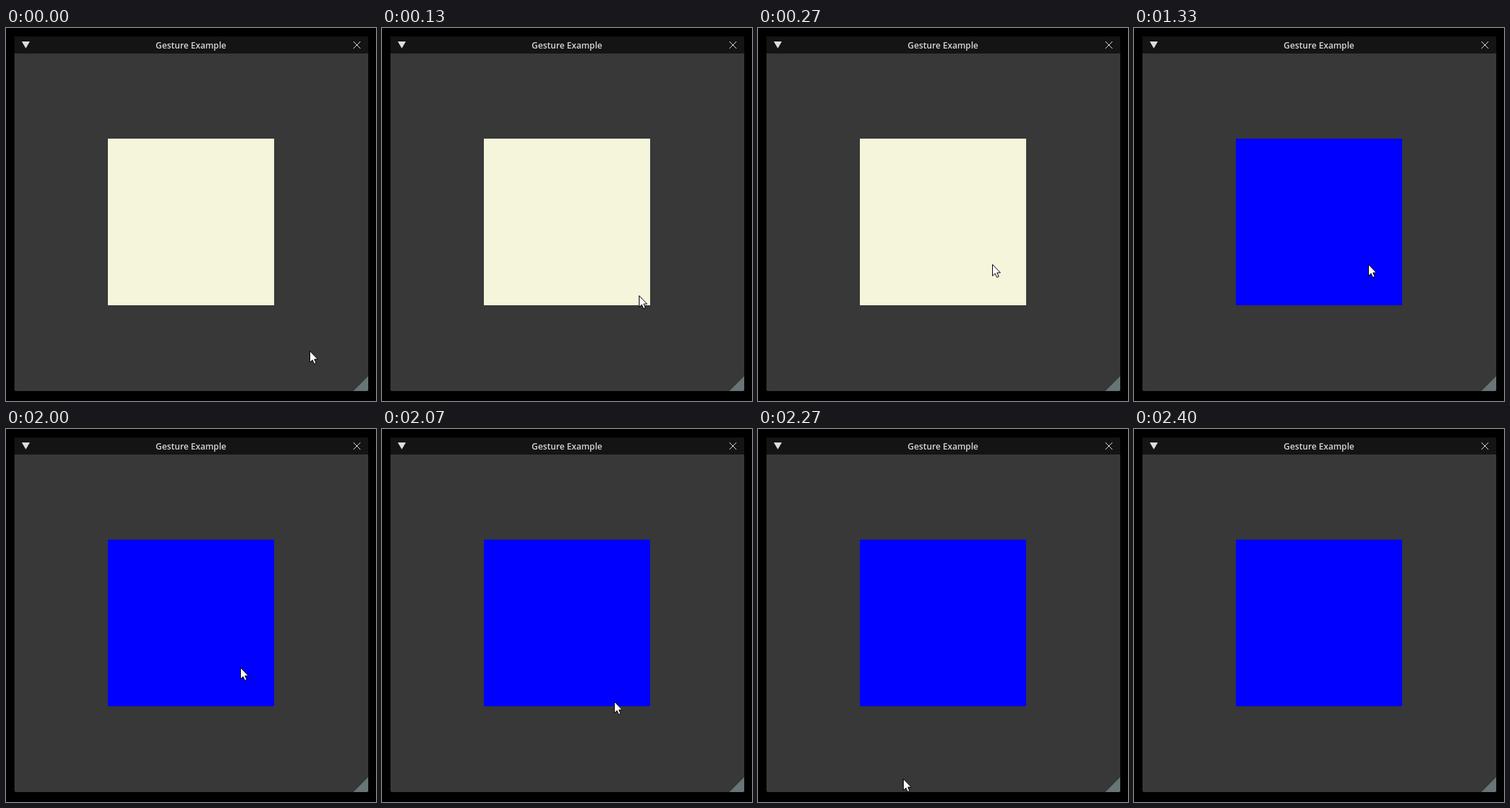
Write an HTML page that moves like this. It is 523 by 526 pixels and loops after 2.67 s.

```html
<!DOCTYPE html>
<html lang="en">
<head>
<meta charset="utf-8">
<title>Gesture Example</title>
<style>
  html, body { margin: 0; width: 100%; height: 100%; overflow: hidden; background: #000; }
  svg { display: block; }
  text { font: 600 12.2px "Open Sans", "Noto Sans", sans-serif; fill: #d6d6d6; text-anchor: middle; }
</style>
</head>
<body>
<svg width="523" height="526" viewBox="0 0 523 526">
  <rect x="12" y="12" width="500" height="500" rx="2" fill="#383838"/>
  <path d="M12 36V14q0-2 2-2H510q2 0 2 2V36z" fill="#141414"/>
  <path d="M22.3 19H33.7L28 28.7z" fill="#dcdcdc"/>
  <text x="261.5" y="29">Gesture Example</text>
  <path d="M491 19L501 29M501 19L491 29" stroke="#dcdcdc"/>
  <path d="M491 512L512 491V510q0 2-2 2z" fill="#687577"/>
  <rect id="square" x="144" y="156" width="235" height="235"/>
  <path id="cursor" d="M.5 .5V16.6L4.2 13.2L6.6 18.6L9.3 17.5L6.9 12.1H11.6z"
        fill="#fff" stroke="#000" stroke-linejoin="round"/>
</svg>
<script>
  const LOOP = 2670;
  const STEP = 200 / 3; // the pointer is sampled 15 times per second
  const PRESS = 1330;
  const LEAVE = 2000;
  const enter = { steps: 4, from: [429, 455], middle: [363, 377], to: [331, 333] };
  const leave = { steps: 6, from: [331, 336], middle: [265, 463], to: [28, 535] };
  const square = document.getElementById("square");
  const cursor = document.getElementById("cursor");

  // Parabola passing through three points at u = 0, 0.5 and 1.
  const curve = (a, b, c, u) =>
    a * (1 - u) * (1 - 2 * u) + 4 * b * u * (1 - u) + c * u * (2 * u - 1);

  function pointerAt({ steps, from, middle, to }, elapsed) {
    const step = Math.floor((elapsed + 4) / STEP);
    const u = Math.min(step / steps, 1);
    return from.map((start, axis) => Math.round(curve(start, middle[axis], to[axis], u)));
  }

  function draw(now) {
    const time = now % LOOP;
    const [x, y] = time < LEAVE ? pointerAt(enter, time) : pointerAt(leave, time - LEAVE);
    cursor.setAttribute("transform", `translate(${x} ${y})`);
    square.setAttribute("fill", time < PRESS ? "#f5f5dc" : "#00f");
  }

  const startTime = performance.now();
  function tick() {
    draw(performance.now() - startTime);
    requestAnimationFrame(tick);
  }
  tick();
</script>
</body>
</html>
```
